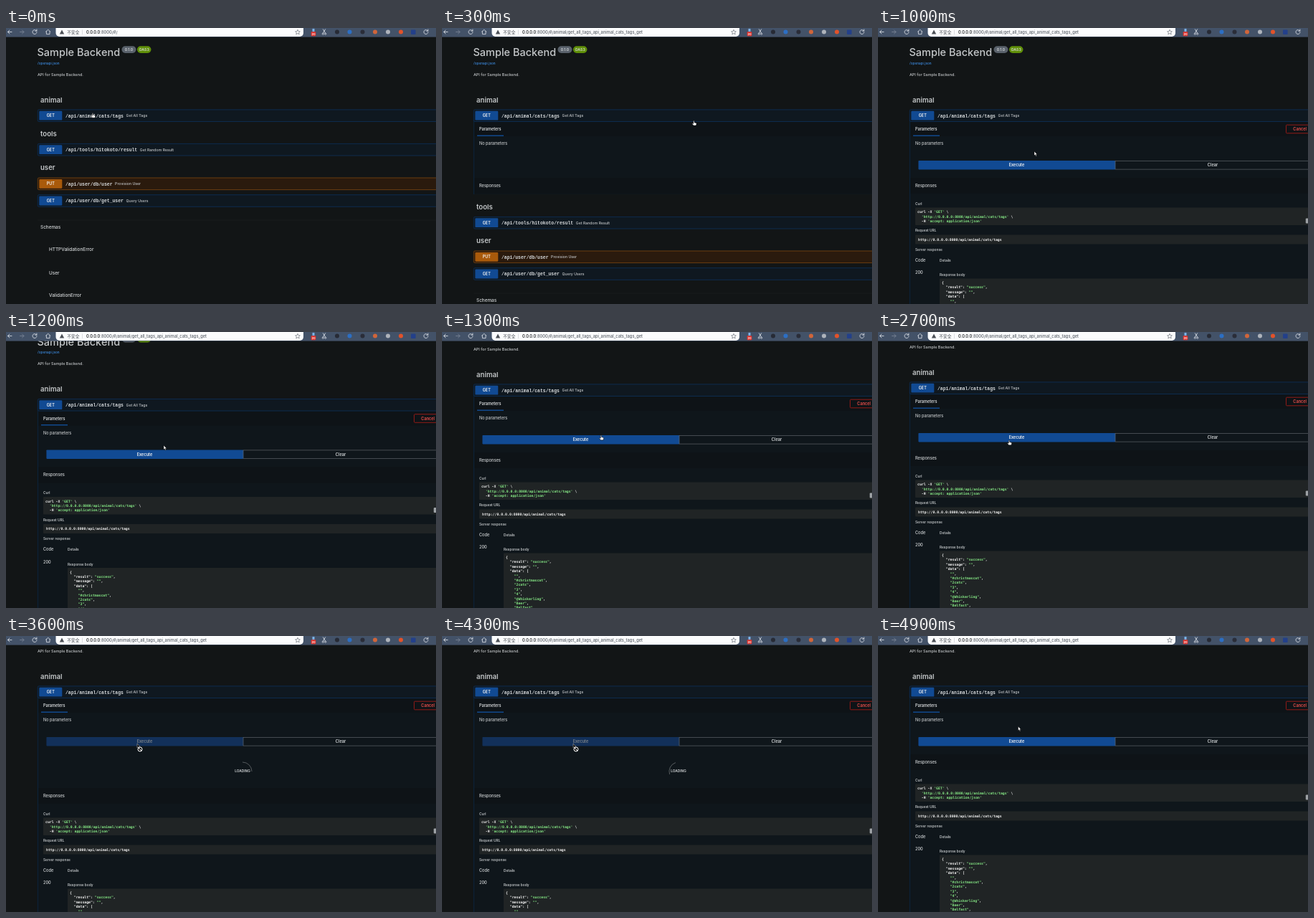
These frames come from a looping animation (600 px wide and 385 px high, 5 s). An HTML page:

```html
<!DOCTYPE html>
<html lang="en">
<head>
<meta charset="utf-8">
<title>Sample Backend</title>
<style>
html, body { margin: 0; width: 100%; height: 100%; overflow: hidden; background: #121516; }
svg { display: block; width: 100vw; height: 100vh; }
text { font-family: Inter, "Noto Sans CJK SC", sans-serif; font-weight: 500; white-space: pre; }
.strong { font-weight: 600; }
.path { font-family: "Liberation Mono", monospace; font-weight: 700; }
.code { font-family: "DejaVu Sans Mono", monospace; font-weight: 700; }
</style>
</head>
<body>
<svg id="stage" viewBox="0 0 600 385"></svg>
<script>
const NS = "http://www.w3.org/2000/svg";
const stage = document.getElementById("stage");
const LOOP = 5000, STEP = 100;
const INK = "#d5d8da", SOFT = "#c4c7c9", WHITE = "#f4f4f4", GREEN = "#86ea86", BLUE = "#114a93";

function add(parent, tag, attrs = {}) {
  const el = document.createElementNS(NS, tag);
  for (const k in attrs) el.setAttribute(k, attrs[k]);
  parent.appendChild(el);
  return el;
}
const group = (parent, attrs) => add(parent, "g", attrs);
const box = (p, x, y, width, height, fill, more) =>
  add(p, "rect", { x, y, width, height, fill, ...more });
const line = (p, d, stroke, width = 0.8, more) =>
  add(p, "path", { d, stroke, fill: "none", "stroke-width": width, ...more });

// y is the vertical middle of the capitals
function label(p, x, y, str, size, more) {
  const el = add(p, "text", { x, y: y + size * 0.36, "font-size": size, fill: INK, ...more });
  el.textContent = str;
  return el;
}
const centred = (p, x, y, str, size, more) =>
  label(p, x, y, str, size, { class: "strong", "text-anchor": "middle", ...more });

// Every second piece of the line is a green string
function code(p, x, y, pieces) {
  const el = label(p, x, y, "", 4.82, { class: "code" });
  pieces.forEach((s, i) => {
    add(el, "tspan", { fill: i % 2 ? GREEN : WHITE }).textContent = s;
  });
}

function row(p, y, verb, path, note) {
  const put = verb === "PUT";
  const edge = put ? "#8a4d10" : "#0c3464";
  box(p, 44.3, y - 8.3, 570, 16.6, put ? "#2a1a0d" : "#0f1820", { rx: 1.5, stroke: edge, "stroke-width": 0.7 });
  box(p, 46.3, y - 6.4, 32, 12.8, put ? "#a95a0b" : BLUE, { rx: 1.2 });
  centred(p, 62.3, y, verb, 5.5, { fill: WHITE });
  label(p, 83, y, path, 6.43, { class: "path" });
  label(p, 86.5 + path.length * 3.86, y, note, 5.2, { fill: SOFT });
}

function heading(p, y, str) {
  label(p, 48, y, str, 9.6, { class: "strong", fill: SOFT });
}

box(stage, 0, 0, 600, 385, "#121516");
const page = group(stage);

// Title block
label(page, 43.5, 34, "Sample Backend", 14.5, { fill: SOFT });
box(page, 161.5, 25.3, 20, 9.6, "#59616b", { rx: 4.8 });
centred(page, 171.5, 30.1, "0.1.0", 5.2);
box(page, 183, 25.3, 19.5, 9.6, "#5f8f08", { rx: 4.8 });
centred(page, 192.7, 30.1, "OAS3", 5.2);
label(page, 44, 49, "/openapi.json", 4.7, { fill: "#3c8be0" });
label(page, 44, 65, "API for Sample Backend.", 5.45, { fill: SOFT });
heading(page, 100.3, "animal");

// Sections pushed down by the open panel
const list = group(page);
heading(list, 147.5, "tools");
row(list, 169.7, "GET", "/api/tools/hitokoto/result", "Get Random Result");
heading(list, 195, "user");
row(list, 217.3, "PUT", "/api/user/db/user", "Provision User");
row(list, 241, "GET", "/api/user/db/get_user", "Query Users");
line(list, "M44 268H600", "#1b2024", 0.6);
label(list, 48, 277.3, "Schemas", 6.4);
["HTTPValidationError", "User", "ValidationError"].forEach((s, i) =>
  label(list, 60, [308.7, 341.8, 372.6][i], s, 6.4));

// Open panel
const clip = add(add(stage, "defs"), "clipPath", { id: "fold" });
const fold = box(clip, 0, 120, 620, 0, "#000");
const panel = group(page, { "clip-path": "url(#fold)" });
box(panel, 44.3, 120, 570, 1000, "#0f161b", { stroke: "#0c2846", "stroke-width": 0.8 });
box(panel, 45, 131, 570, 20, "#0e1317");
label(panel, 52, 141.2, "Parameters", 5.5, { class: "strong" });
box(panel, 49, 149.5, 37, 1.4, "#114d96");
label(panel, 52, 161.3, "No parameters", 5.55, { fill: SOFT });

const form = group(panel);
box(form, 569.5, 135.2, 40, 11.6, "none", { rx: 1, stroke: "#a01c18", "stroke-width": 0.9 });
centred(form, 588.7, 141.2, "Cancel", 5.6, { fill: "#f0504c" });
const run = box(form, 56.4, 185, 274.8, 12.4, BLUE, { rx: 0.8 });
const runText = centred(form, 193.5, 191.3, "Execute", 5.6);
const clear = group(form);
box(clear, 331, 185.4, 280, 11.7, "none", { stroke: "#686d72", "stroke-width": 0.6 });
centred(clear, 467, 191.3, "Clear", 5.6);

const loader = group(panel);
const arc = line(loader, "M320.8 223.8A13 13 0 0 1 339.2 223.8", "#6c7073", 0.7);
centred(loader, 330, 232.3, "LOADING", 4.8);

// Responses
const lower = group(panel);
box(lower, 45, 209, 570, 22, "#0e1317");
label(lower, 52, 219.8, "Responses", 5.7);
const reply = group(lower);
const small = (x, y, s) => label(reply, x, y, s, 4.8);
small(52, 245.2, "Curl");
box(reply, 52, 250.5, 560, 24.6, "#202425", { rx: 1 });
code(reply, 55, 256.7, ["curl -X ", "'GET'", " \\"]);
code(reply, 55, 262.9, ["  ", "'http://0.0.0.0:8000/api/animal/cats/tags'", " \\"]);
code(reply, 55, 269.1, ["  -H ", "'accept: application/json'"]);
box(reply, 596.8, 265.5, 6, 7, "#9da1a5", { rx: 1 });
small(52, 282.4, "Request URL");
box(reply, 52, 288.6, 560, 12.8, "#202425", { rx: 1 });
label(reply, 56, 295, "http://0.0.0.0:8000/api/animal/cats/tags", 4.85, { class: "code", fill: WHITE });
small(52, 309.2, "Server response");
label(reply, 52, 323.6, "Code", 5.6);
small(86, 323.8, "Details");
label(reply, 52, 341, "200", 5.6);
small(86, 344.3, "Response body");
box(reply, 86, 349.6, 530, 400, "#202425", { rx: 1 });
const tags = ["", "#christmascat", "2cats", "3", "4", "@Whiskerling", "Beer", "Belfast"];
const body = [
  ["{"],
  ['  "result": ', '"success"', ","],
  ['  "message": ', '""', ","],
  ['  "data": ['],
  ...tags.map(s => ["    ", `"${s}"`, ","])
];
body.forEach((pieces, i) => code(reply, 89, 355.3 + i * 6.4, pieces));

// The closed header stays on top of the panel
row(page, 122.2, "GET", "/api/animal/cats/tags", "Get All Tags");

// Browser bar
const bar = group(stage);
box(bar, 0, 0, 600, 12.6, "#435268");
box(bar, 69.5, -4, 345.5, 16, "#fbfcfd", { rx: 5 });
const round = { "stroke-linecap": "round", "stroke-linejoin": "round" };
const PALE = "#e4e8ee";
line(bar, "M8 5.5H2.5M5 3L2.5 5.5L5 8", PALE, 0.8, round);
line(bar, "M19.5 5.5H25M22.5 3L25 5.5L22.5 8", "#7d8798", 0.8, round);
const reload = x => line(bar, `M${x + 2.6} 4A3 3 0 1 0 ${x + 3} 6M${x + 2.9} 2V4.2H${x + 0.8}`, PALE, 0.8, round);
reload(40);
line(bar, "M55.5 5.2L58.7 2.3L61.9 5.2M56.4 4.8V8.6H61V4.8", PALE, 0.8, round);
add(bar, "path", { d: "M78 2.6L81.2 8.4H74.8Z", fill: "#4c5057" });
label(bar, 85.3, 5.6, "不安全", 5.7, { fill: "#444950" });
line(bar, "M106.5 2.5V9", "#b9bdc3", 0.5);
const url = label(bar, 112, 5.8, "", 5.75, { fill: "#5c626a" });
add(url, "tspan", { fill: "#14171a" }).textContent = "0.0.0.0";
const route = add(url, "tspan");
line(bar, "M407 2.4L408 4.7L410.4 4.9L408.6 6.5L409.2 8.8L407 7.5L404.8 8.8L405.4 6.5L403.6 4.9L406 4.7Z", "#535a63", 0.6);

// Extension buttons as plain shapes
const dot = (x, fill) => add(bar, "circle", { cx: x, cy: 5.6, r: 3, fill });
box(bar, 425.7, 5.2, 6.6, 6, "#e0322c", { rx: 1 });
box(bar, 427.5, 1, 3, 4, "#7db4e8");
centred(bar, 429, 8.3, "20", 4, { fill: "#fff" });
line(bar, "M442.4 1.8L445.6 7M445.6 1.8L442.4 7", PALE, 0.8, round);
add(bar, "circle", { cx: 442.3, cy: 8.2, r: 1.1, fill: "none", stroke: PALE, "stroke-width": 0.7 });
add(bar, "circle", { cx: 445.7, cy: 8.2, r: 1.1, fill: "none", stroke: PALE, "stroke-width": 0.7 });
dot(462, "#272b35");
dot(479.5, "#2c6fc4");
dot(497.5, "#2a2d38");
dot(515, "#d0653a");
dot(533, "#aeb3bb");
dot(551, "#e2522a");
box(bar, 565, 2.4, 6.6, 6.6, "#23408a", { rx: 1 });
reload(586);

// Pointers, each with its hot spot at 0,0
const pointer = group(stage);
const shape = d => add(pointer, "path", { d, fill: "#fff", stroke: "#000", "stroke-width": 0.5, "stroke-linejoin": "round" });
const arrowPath = "M0 0V6L1.4 4.8L2.4 7L3.4 6.5L2.4 4.4H4.2Z";
const arrow = shape(arrowPath);
const hand = shape("M-.7 .4Q0 -.5 .6 .4V2.6L3 3.2Q3.8 3.5 3.6 4.6L3 6.8H-.5L-2.4 4.4Q-2.3 3.4 -.7 4.3Z");
const banned = group(pointer);
add(banned, "path", { d: arrowPath, fill: "#111", stroke: "#ddd", "stroke-width": 0.4 });
add(banned, "circle", { cx: 4, cy: 8, r: 3, fill: "#111", stroke: "#fff", "stroke-width": 1 });
line(banned, "M1.9 5.9L6.1 10.1", "#fff", 1);

const ease = u => u * u * (3 - 2 * u);

// keys: [time, value, value, ...]
function track(keys, t) {
  const i = keys.findIndex(k => k[0] > t);
  if (i < 0) return keys[keys.length - 1].slice(1);
  if (!i) return keys[0].slice(1);
  const a = keys[i - 1], b = keys[i];
  const u = ease((t - a[0]) / (b[0] - a[0]));
  return a.slice(1).map((v, n) => v + (b[n + 1] - v) * u);
}

const moves = [
  [0, 121, 118.5], [200, 121, 118.5], [400, 582, 140], [600, 205, 190], [800, 205, 190],
  [1000, 218, 172], [1100, 218, 172], [1300, 222, 144], [1400, 222, 144], [1900, 184, 147],
  [2400, 184, 147], [2700, 183, 151], [3200, 183, 151], [3300, 183, 150], [4400, 183, 150],
  [4900, 195.5, 126]
];
const scrolls = [[1100, 0], [1300, 41], [1500, 44]];
const bottoms = [[0, 130], [300, 232]];

const show = (el, on) => el.setAttribute("display", on ? "inline" : "none");
const shift = (el, x, y) => el.setAttribute("transform", `translate(${x} ${y})`);
const within = (t, a, b) => t >= a && t < b;

function draw(time) {
  const t = Math.floor(time / STEP) * STEP;
  const busy = within(t, 700, 900) || within(t, 3500, 4400);
  const answered = t >= 900;
  const bottom = answered ? 1100 : track(bottoms, t)[0] + (busy ? 47 : 0);

  shift(page, 0, -track(scrolls, t)[0]);
  fold.setAttribute("height", bottom - 120);
  show(panel, t > 0);
  shift(list, 0, bottom - 130);
  show(form, t >= 400);
  show(clear, answered);
  show(reply, answered);
  show(loader, busy);
  shift(lower, 0, busy ? 47 : 0);
  run.setAttribute("fill", busy ? "#12305a" : BLUE);
  run.setAttribute("width", answered ? 274.8 : 555);
  runText.setAttribute("x", answered ? 193.5 : 330);
  runText.setAttribute("fill", busy ? "#7d8388" : WHITE);
  arc.setAttribute("transform", `rotate(${45 + (t - 3600) * 0.36} 330 233)`);
  route.textContent = ":8000/#/" + (t ? "animal/get_all_tags_api_animal_cats_tags_get" : "");

  const [x, y] = track(moves, t);
  const pointing = t < 200 || within(t, 300, 700) || within(t, 1300, 3500);
  shift(pointer, x, y);
  show(banned, busy);
  show(hand, !busy && pointing);
  show(arrow, !busy && !pointing);
}

const start = performance.now();
function tick() {
  draw((performance.now() - start) % LOOP);
  requestAnimationFrame(tick);
}
tick();
</script>
</body>
</html>
```
